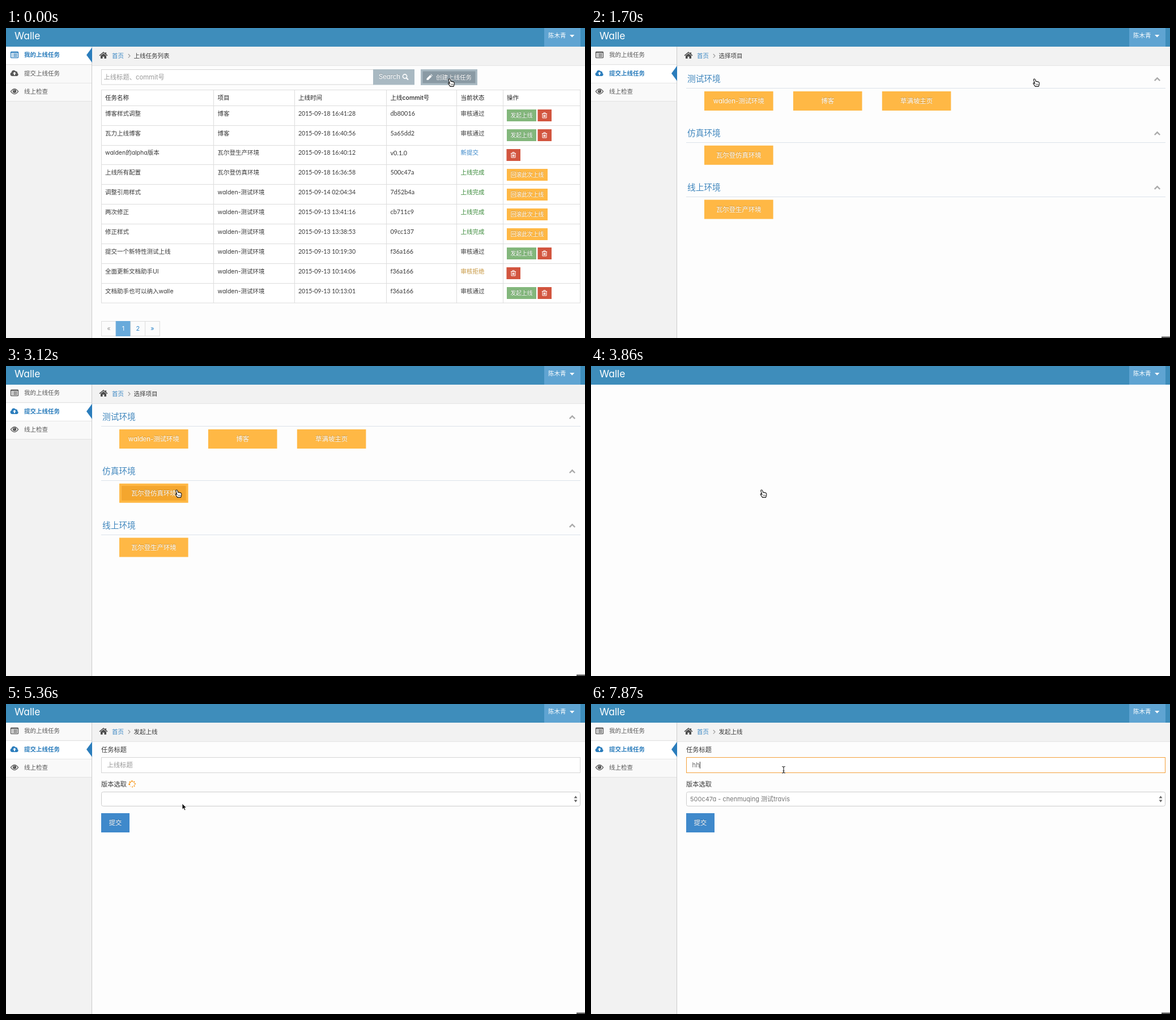
An HTML page that plays this animation: 1022x548 px, repeating every 8 s.

```html
<!DOCTYPE html>
<html lang="zh-CN">
<head>
<meta charset="utf-8">
<title>Walle</title>
<style>
html, body { margin: 0; width: 100%; height: 100%; overflow: hidden; background: #fdfdfd; }
svg { display: block; width: 100vw; height: 100vh; }
text { font-family: Inter, "Noto Sans CJK SC", "Noto Sans CJK", sans-serif; font-feature-settings: "cv11"; white-space: pre; }
.num { font-family: Lato, "Noto Sans CJK SC", "Noto Sans CJK", sans-serif; }
.btn { text-shadow: 0 -1px 0 rgba(0, 0, 0, .2); }
</style>
</head>
<body>
<svg id="stage" viewBox="0 0 1022 548"></svg>
<script>
const LOOP = 8000;
const INK = '#393939', BLUE = '#2b7dbc', GREY = '#585858', ORANGE = '#ffb845';

const rect = (x, y, w, h, fill, extra = '') =>
  `<rect x="${x}" y="${y}" width="${w}" height="${h}" fill="${fill}" ${extra}/>`;
const box = (x, y, w, h, stroke = '#d5d5d5', extra = '') =>
  rect(x, y, w, h, '#fff', `stroke="${stroke}" ${extra}`);
const path = (d, extra) => `<path d="${d}" ${extra}/>`;
const line = (d, stroke, width = 1) => path(d, `fill="none" stroke="${stroke}" stroke-width="${width}"`);
const at = (x, y, body, extra = '') => `<g transform="translate(${x} ${y})" ${extra}>${body}</g>`;
// cy is the vertical middle of the glyphs
const text = (x, cy, str, size = 10.5, fill = INK, extra = '') =>
  `<text x="${x}" y="${cy + size * .37}" font-size="${size}" fill="${fill}" ${extra}>${str}</text>`;
const label = (x, cy, str, size) => text(x, cy, str, size, '#fff', 'text-anchor="middle" class="btn"');

// Icons, each centred on 0,0
const icons = {
  list: c => `<rect x="-6.5" y="-5.2" width="13" height="10.6" rx="1" fill="none" stroke="${c}" stroke-width="1.3"/>` +
    line('M-6-4H6', c, 1.6) +
    line('M-4.6-1.5h1.4M-2-1.5h6.8M-4.6.8h1.4M-2 .8h6.8M-4.6 3.1h1.4M-2 3.1h6.8', c, 1.2),
  cloud: c => path('M-4 5.2A3.4 3.4 0 0 1-5.4-1.3 4.1 4.1 0 0 1 2.1-3.2 2.7 2.7 0 0 1 5.2 0 2.8 2.8 0 0 1 4.6 5.2Z', `fill="${c}"`) +
    path('M0-2.2 3 .9H1.1V3.6H-1.1V.9H-3Z', 'fill="#fff"'),
  eye: c => path('M-6.6 0Q0-9 6.6 0 0 9-6.6 0Z', `fill="none" stroke="${c}" stroke-width="1.3"`) +
    `<circle r="3.2" cy="-.4" fill="${c}"/>` + line('M-1.6-.8A1.8 1.8 0 0 1 0-2.3', '#fff', .8),
  home: c => path('M-5 .6 0-3.6 5 .6V5.4H1.4V2H-1.4V5.4H-5Z', `fill="${c}"`) +
    line('M-7 .3 0-5.5 7 .3', c, 1.5) + rect(3.2, -5.4, 1.8, 3.6, c),
  search: c => `<circle cx="-1" cy="-1" r="3.6" fill="none" stroke="${c}" stroke-width="1.6"/>` + line('M1.7 1.7 5 5', c, 2),
  pencil: c => path('M-5 5V2.2L1.3-4.1 4.1-1.3-2.2 5ZM2.1-4.9 3-5.5 5.4-3.1 4.9-2.1Z', `fill="${c}"`),
  trash: c => line('M-4.6-3H4.6M-1.6-3.2V-4.7H1.6V-3.2M-3.5-2.6V4.5H3.5V-2.6M-1.4-1V3M0-1V3M1.4-1V3', c)
};
const icon = (name, x, y, color) => at(x, y, icons[name](color));

const header = () =>
  rect(0, 0, 1022, 33, '#3e8dbb') + text(15, 13.5, 'Walle', 17.4, '#fff') +
  rect(950, 0, 64, 33, '#5fa4d2') + text(957, 13, '陈木青', 10.5, '#fff') +
  path('M995 12h8.400l-4.200 4.400Z', 'fill="#fff"');

const emptySide = () =>
  rect(0, 33, 151, 515, '#f2f2f2') + rect(0, 33, 151, 8, '#fafafa') + line('M151.500 33V548', '#ccc');

const menu = [['list', '我的上线任务'], ['cloud', '提交上线任务'], ['eye', '线上检查']];
function frame(active, crumb) {
  const items = menu.map(([name, title], i) => {
    const y = 47.3 + i * 32.4, on = i === active, color = on ? BLUE : GREY;
    return rect(0, y - 14.3, 151, 31.4, on ? '#fff' : '#f9f9f9') +
      line(`M0 ${Math.round(y + 17) + .5}H151`, '#e2e2e2') +
      icon(name, 15, y, color) +
      text(32, y, title, 10.5, color, on ? 'font-weight="700"' : '') +
      (on ? path(`M142 ${y + .5} 152 ${y - 13}V${y + 14}Z`, `fill="${BLUE}"`) : '');
  }).join('');
  return emptySide() + items +
    rect(152, 33, 870, 33, '#f2f2f2') + line('M152 66.500H1022', '#e4e4e4') +
    icon('home', 172, 48.5, '#4c4c4c') + text(187, 49, '首页', 10.5, '#3a87c4') +
    line('M215.800 46 219 49.300 215.800 52.600', '#999', 1.1) + text(225.5, 49, crumb);
}

const states = {
  pass: ['审核通过', INK], fresh: ['新提交', '#3a87c9'],
  done: ['上线完成', '#3a8a3a'], refused: ['审核拒绝', '#c6963f']
};
const tasks = [
  ['博客样式调整', '博客', '2015-09-18 16:41:28', 'db80016', 'pass'],
  ['瓦力上线博客', '博客', '2015-09-18 16:40:56', '5a65dd2', 'pass'],
  ['walden的alpha版本', '瓦尔登生产环境', '2015-09-18 16:40:12', 'v0.1.0', 'fresh'],
  ['上线所有配置', '瓦尔登仿真环境', '2015-09-18 16:36:58', '500c47a', 'done'],
  ['调整引用样式', 'walden-测试环境', '2015-09-14 02:04:34', '7d52b4a', 'done'],
  ['两次修正', 'walden-测试环境', '2015-09-13 13:41:16', 'cb711c9', 'done'],
  ['修正样式', 'walden-测试环境', '2015-09-13 13:38:53', '09cc137', 'done'],
  ['提交一个新特性测试上线', 'walden-测试环境', '2015-09-13 10:19:30', 'f36a166', 'pass'],
  ['全面更新文档助手UI', 'walden-测试环境', '2015-09-13 10:14:06', 'f36a166', 'refused'],
  ['文档助手也可以纳入walle', 'walden-测试环境', '2015-09-13 10:13:01', 'f36a166', 'pass']
];
const columns = [175, 373.5, 516, 678.5, 802.5, 884];
const ROW = 34.87;

function actions(state, y) {
  const trash = x => rect(x, y, 24.5, 21, '#d2553f') + icon('trash', x + 12, y + 10.5, '#fff');
  if (state === 'done') return rect(884, y, 72, 21, ORANGE) + label(920, y + 10.5, '回滚此次上线', 9.75);
  if (state === 'pass') return rect(884, y, 52, 21, '#83b77c') + label(910, y + 10.5, '发起上线', 9.75) + trash(938.5);
  return trash(883.5);
}

function listPage() {
  let out = frame(0, '上线任务列表') +
    box(168.5, 73.5, 480, 26.5) + text(172.5, 86.5, '上线标题、commit号', 11.3, '#999') +
    rect(648, 73, 73, 27.5, '#a9b9c2') + text(658, 86, 'Search', 11.3, '#fff', 'class="btn"') + icon('search', 705, 86.5, '#fff') +
    rect(732, 73, 100, 28, '#a9b9c2') + rect(735.5, 76.5, 93, 21, '#8a9aa4') +
    icon('pencil', 747.5, 87, '#fff') + label(790.5, 87, '创建上线任务', 10.5) +
    box(168.5, 109.5, 845, 376.5, '#ddd');
  ['任务名称', '项目', '上线时间', '上线commit号', '当前状态', '操作'].forEach((title, i) => {
    out += text(columns[i], 123, title, 10.5, '#222', 'font-weight="500"');
    if (i) out += line(`M${Math.floor(columns[i] - 7) + .5} 110V486`, '#ddd');
  });
  tasks.forEach(([name, project, time, commit, state], i) => {
    const top = 137.3 + i * ROW, y = top + 13.5;
    const [title, color] = states[state];
    out += line(`M169 ${Math.floor(top) + .5}H1013`, '#ddd') +
      text(columns[0], y, name) + text(columns[1], y, project) +
      text(columns[2], y, time, 10.5, INK, 'class="num"') +
      text(columns[3], y, commit, 10.8, INK, 'class="num"') +
      text(columns[4], y, title, 10.5, color) + actions(state, Math.round(top + 7));
  });
  ['«', '1', '2', '»'].forEach((mark, i) => {
    const x = 168.5 + i * 25.7, on = i === 1;
    out += rect(x, 518.5, 25.7, 26, on ? '#68aadb' : '#fbfbfb', `stroke="${on ? '#68aadb' : '#ddd'}"`) +
      text(x + 12.8, 531, mark, 10.8, on ? '#fff' : i ? '#2a83c8' : '#999', 'text-anchor="middle"');
  });
  return out;
}

const corner = () => rect(1007, 545.5, 15, 2.5, '#555');

const groups = [
  ['测试环境', ['walden-测试环境', '博客', '草满坡主页']],
  ['仿真环境', ['瓦尔登仿真环境']],
  ['线上环境', ['瓦尔登生产环境']]
];
function pickPage() {
  return frame(1, '选择项目') + corner() + groups.map(([title, names], g) => {
    const y = 90 + g * 95.8;
    return text(170, y, title, 14.7, '#3f86bd') +
      line(`M168 ${Math.floor(y + 16.5) + .5}H1014`, '#dbe2ea') +
      line(`M994.800 ${y + 3.2} 999.500 ${y - 1.5} 1004.200 ${y + 3.2}`, '#aaa', 2.4) +
      names.map((name, i) => {
        const x = 200 + i * 156.9, top = y + 22;
        return rect(x, top, 121.6, 34, ORANGE) +
          rect(x + 4, top + 4, 113.6, 26, '#f4a62e', `id="hover${g}${i}" opacity="0"`) +
          label(x + 60.8, top + 17, name, 11.4);
      }).join('');
  }).join('');
}

function spinnerDots() {
  let out = '';
  for (let i = 0; i < 8; i++) {
    const a = (i * 45 - 45) * Math.PI / 180;
    out += `<circle cx="${5 * Math.cos(a)}" cy="${5 * Math.sin(a)}" r="${i ? 1.65 - i * .08 : .6}"/>`;
  }
  return out;
}

function formPage() {
  return frame(1, '发起上线') + corner() +
    text(168, 81, '任务标题', 11.25) + box(168.5, 94.5, 845, 27, '#d5d5d5', 'id="field"') +
    text(178.5, 108, '上线标题', 11.3, '#999', 'id="hint"') +
    text(178.5, 107.5, '', 11.3, '#696969', 'id="typed"') +
    rect(178, 102, 1, 12, '#333', 'id="caret"') +
    text(168, 142, '版本选取', 11.25) + '<g id="spinner" fill="#f8981d"></g>' +
    box(168.5, 155.5, 845, 25, '#ccc', 'rx="3"') +
    text(175, 167.5, '500c47a - chenmuqing 测试travis', 11, '#757575', 'id="version"') +
    path('M1002.500 166.500h6l-3-4.200ZM1002.500 169.500h6l-3 4.200Z', 'fill="#666"') +
    rect(168, 193, 50, 34, '#3f89cb') + label(193, 210, '提交', 11.25);
}

const pointers = {
  hand: path('M-2.600 1.500-4.700-5.200Q-4.800-7-3.300-7-2.300-7-1.800-5.600L-.8-2.400Q.2-3.300 1.300-2.200 2.400-2.800 3.200-1.600 5-1.900 5.300 0L5.200 3 4 6.400H-1.800L-5.200 1.500Q-5.700-.2-4.200-.1Z',
    'fill="#fff" stroke="#111" stroke-width="1.1" stroke-linejoin="round"') + line('M-.3 1.500V4.300M1.500 1.500V4.300M3.200 1.500V4.300', '#333', .7),
  arrow: path('M0 0V10.300L2.400 8.200 4 12 6 11.200 4.400 7.500H7.600Z', 'fill="#111" stroke="#fff" stroke-width=".8"'),
  beam: line('M-2.800-5.500Q0-5.500 0-3.800 0-5.500 2.800-5.500M0-4V4.500M-2.800 6Q0 6 0 4.300 0 6 2.800 6M-1.500 2.200H1.500', '#222', 1.1)
};

const pages = [
  [0, 'list', listPage], [1490, 'side', emptySide], [1700, 'pick', pickPage],
  [3860, 'blank', () => ''], [4610, 'form', formPage]
];
const moves = [
  [0, 'hand', 786, 97], [2210, 'arrow', 738, 98], [2360, 'hand', 560, 134],
  [2530, 'arrow', 359, 184], [2680, 'arrow', 326, 205], [2830, 'hand', 308, 223], [2980, 'hand', 304.5, 226],
  [5210, 'arrow', 303, 212], [5360, 'arrow', 311, 176], [5510, 'arrow', 330, 136], [5650, 'beam', 340, 116]
];
const hoverA = [[0, 0], [2360, .6], [2530, 1], [2680, .35], [2830, 0]];
const hoverB = [[0, 0], [2830, .4], [2980, .8], [3120, 1]];
const borders = [[0, '#d5d5d5'], [6380, '#e8bd92'], [6530, '#f0a850'], [6680, '#f4a03a']];
const typing = [[0, ''], [7720, 'h'], [7870, 'hh']];
const carets = [[0, 0], [6380, 1], [6830, 0], [7420, 1]];
const ticks = [4610, 4910, 5060, 5210, 5360, 5510, 5650, 5800, 5950, 6100, 6230, 6380, 6530, 6680, 6830, 6970].map(t => [t]);

const current = (steps, t) => steps.findLast(s => s[0] <= t) || steps[0];

const stage = document.getElementById('stage');
stage.innerHTML = rect(0, 0, 1022, 548, '#fdfdfd') +
  pages.map(([, id, draw]) => `<g id="${id}">${draw()}</g>`).join('') + header() +
  Object.entries(pointers).map(([id, art]) => `<g id="${id}">${art}</g>`).join('');

const el = id => document.getElementById(id);
const show = (id, on) => el(id).setAttribute('display', on ? 'inline' : 'none');
el('spinner').innerHTML = spinnerDots();

function render(t) {
  const page = current(pages, t)[1];
  pages.forEach(([, id]) => show(id, id === page));

  const [, pointer, x, y] = current(moves, t);
  Object.keys(pointers).forEach(id => show(id, id === pointer));
  el(pointer).setAttribute('transform', `translate(${x} ${y})`);

  el('hover02').setAttribute('opacity', current(hoverA, t)[1]);
  el('hover10').setAttribute('opacity', current(hoverB, t)[1]);

  const typed = current(typing, t)[1];
  el('field').setAttribute('stroke', current(borders, t)[1]);
  el('typed').textContent = typed;
  show('hint', !typed);
  show('caret', current(carets, t)[1]);
  el('caret').setAttribute('x', 178 + (page === 'form' && typed ? el('typed').getComputedTextLength() + .5 : 0));

  const angle = (current(ticks, t)[0] - 6380) * .18;
  el('spinner').setAttribute('transform', `translate(222.700 141.500) rotate(${angle})`);
  show('spinner', t < 7120);
  show('version', t >= 6970);
}

const start = performance.now();
function loop() {
  render((performance.now() - start) % LOOP);
  requestAnimationFrame(loop);
}
loop();
</script>
</body>
</html>
```
